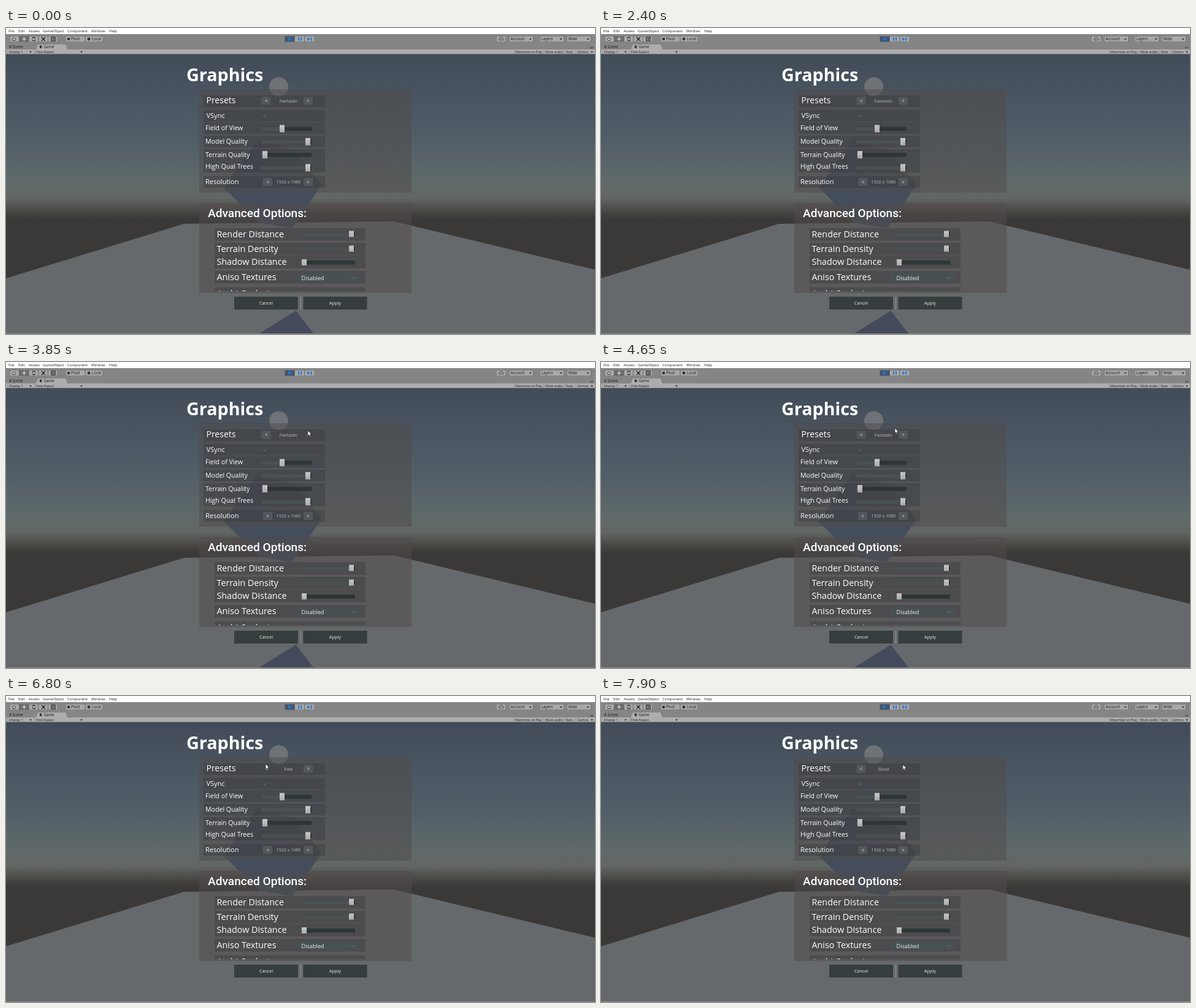
Animation of 960 by 500 pixels, one loop 8000 ms. Source, as an HTML page with a canvas:

```html
<!DOCTYPE html>
<html lang="en">
<head>
<meta charset="utf-8">
<title>Graphics settings</title>
<style>
html, body { margin: 0; width: 960px; height: 500px; overflow: hidden; background: #444; }
canvas { display: block; }
</style>
</head>
<body>
<canvas id="stage" width="960" height="500"></canvas>
<script>
const c = document.getElementById('stage').getContext('2d');
const LOOP = 8000, STEP = 50;
const INK = '#1a1a1a', BAR = '#adadad';

const levels = ['Fast', 'Simple', 'Good', 'Beautiful', 'Fantastic'];
const prevClicks = [1150, 3100, 5600, 6300, 6550, 6800];
const nextClicks = [1550, 3850, 7600, 7900];

const outside = [470, 0], prev = [423, 111], next = [492, 112];
// pointer moves: start, end, where it comes to rest
const moves = [
  [750, 1050, prev], [1250, 1550, next], [1600, 1950, [480, 136]], [1950, 2400, outside],
  [2500, 2750, next], [2750, 3050, prev], [3200, 3300, [425, 107]],
  [3400, 3800, next], [3950, 4150, [488, 111]], [4600, 4650, [479, 108]],
  [4650, 5000, [416, 111]], [5500, 5900, prev], [6800, 7450, next]
];

function box(x, y, w, h, fill) {
  c.fillStyle = fill;
  c.fillRect(x, y, w, h);
}
function text(s, x, y, size, { fill = '#fff', weight = 400, align = 'left', font = 'Open Sans' } = {}) {
  c.font = `${weight} ${size}px "${font}", sans-serif`;
  c.textAlign = align;
  c.fillStyle = fill;
  c.fillText(s, x, y);
}
function poly(points, fill, stroke, width = 1) {
  c.beginPath();
  points.forEach(([x, y]) => c.lineTo(x, y));
  if (fill) { c.closePath(); c.fillStyle = fill; c.fill(); }
  if (stroke) { c.strokeStyle = stroke; c.lineWidth = width; c.stroke(); }
}
function disc(x, y, r, fill) {
  c.beginPath();
  c.arc(x, y, r, 0, Math.PI * 2);
  c.fillStyle = fill;
  c.fill();
}
function shade(y, h, stops) {
  const g = c.createLinearGradient(0, y, 0, y + h);
  stops.forEach(([at, color]) => g.addColorStop(at, color));
  return g;
}

const drop = (x, y) => poly([[x - 2, y - 1], [x + 2, y - 1], [x, y + 1.2]], INK);
function button(x, w, label = '', inset = 2.5) {
  box(x, 13, w, 10, '#606060');
  box(x + .5, 13.5, w - 1, 9, '#a8a8a8');
  text(label, x + inset, 20.2, 6.2, { fill: INK });
}

function toolIcons() {
  for (let i = 0; i < 5; i++) button(6 + i * 15.6, 15.6);
  box(22, 13.5, 15, 9, '#6a6a6a');
  disc(13, 18.5, 2.6, '#333');
  disc(13, 18.5, 1.8, '#ccc');
  box(26, 17.5, 7, 1, '#eee');
  box(29, 14.5, 1, 7, '#eee');
  c.strokeStyle = INK;
  c.lineWidth = 1.2;
  for (const turn of [.4, 3.5]) {
    c.beginPath();
    c.arc(45.5, 18, 2.7, turn, turn + 2.3);
    c.stroke();
  }
  poly([[58, 15], [64, 21]], null, INK, 1.2);
  poly([[64, 15], [58, 21]], null, INK, 1.2);
  c.strokeRect(74, 15, 6, 6);
  box(76, 17, 2, 2, INK);
}

function playControls() {
  const blue = '#2878d8';
  for (let i = 0; i < 3; i++) button(454 + i * 16.4, 16.4);
  box(454.5, 13.5, 15.5, 9, '#42566f');
  poly([[460, 15], [466, 18], [460, 21]], blue);
  poly([[491, 15], [496, 18], [491, 21]], blue);
  [476, 480, 496.5].forEach(x => box(x, 15, 2, 6, blue));
}

function cloud() {
  button(799, 16);
  for (const [grow, fill] of [[0, '#333'], [-.7, '#a8a8a8']]) {
    disc(804.8, 18.7, 1.9 + grow, fill);
    disc(807.2, 17.3, 2.5 + grow, fill);
    disc(809.6, 18.6, 2 + grow, fill);
  }
}

function editor() {
  box(0, 0, 960, 10, '#fff');
  box(0, 10, 960, 25, '#858585');
  box(0, 35, 960, 8, BAR);
  box(0, 42.3, 960, .7, '#666');
  const menus = { File: 4, Edit: 20, Assets: 37, GameObject: 60, Component: 100, Window: 139, Help: 168 };
  for (const s in menus) text(s, menus[s], 7, 6, { fill: INK });

  toolIcons();
  button(97, 32, 'Pivot', 9);
  button(129, 29, 'Local', 11);
  box(100, 16, 4, 4, '#333');
  disc(135, 18, 2.4, '#333');
  playControls();
  cloud();
  const lists = { Account: 820, Layers: 870, Wide: 914 };
  for (const s in lists) {
    button(lists[s], 39.5, s);
    drop(lists[s] + 34.5, 18.2);
  }

  poly([[49, 35], [52, 27], [97, 27], [100, 35]], BAR);
  text('# Scene', 5, 33, 6.2, { fill: INK });
  disc(57, 30.8, 2.3, INK);
  box(57, 30, 3, 1.5, BAR);
  text('Game', 61.5, 33, 6.2, { fill: INK });
  [31, 32.7].forEach(y => box(952, y, 5, .6, '#333'));

  const options = { 'Display 1': 5, 'Free Aspect': 49, 'Maximize on Play': 830, 'Mute audio': 879, Stats: 912, Gizmos: 931 };
  for (const s in options) {
    text(s, options[s], 40.7, 5.4, { fill: INK, weight: 500 });
    box(options[s] - 2.5, 36, .5, 6, '#777');
  }
  [40, 123, 955].forEach(x => drop(x, 39.2));
}

function world(shadow) {
  box(0, 43, 960, 457, shade(43, 270, [
    [0, '#424c59'], [.5, '#505d67'], [.78, '#606a69'], [.87, '#626663'], [.96, '#454340'], [1, '#3b3937']]));
  poly([[0, 409], [290, 320], [632, 316], [960, 395], [960, 500], [0, 500]], '#66696b');
  disc(444.5, 96, 15.5, '#6f7377');
  poly([[410, 183], [470, 200], [514, 257], [466, 327], [413, 318], [355, 261]], '#434d5c');
  poly([[410, 183], [470, 200], [514, 257], [430, 240]], '#4b5159');
  if (shadow) poly([[472.5, 462], [501, 499], [413, 499]], '#434a5b');
  box(0, 499, 960, 1, '#858886');
}

const ROW = 'rgba(52,55,60,.36)';

function slider(x, w, y, value, height = 12) {
  const knob = x + 6 + value * (w - 12);
  box(x, y - 3, w, 6.5, '#2c3636');
  box(x, y - 3, knob - x, 6.5, '#495153');
  box(knob - 4, y - height / 2, 8, height, shade(y - 6, 12, [[0, '#c9c9c9'], [1, '#a9a9a9']]));
}
function stepper(y, label, x, x2, tip) {
  for (const [s, at] of [['<', x], ['>', x2]]) {
    const hover = tip && Math.hypot(tip[0] - at, tip[1] - y) < 10;
    if (!hover) box(at - 7.5, y - 6.5, 15, 13, '#52575b');
    text(s, at, y + 3, 8.2, { fill: '#e4e4e4', align: 'center' });
  }
  text(label, 460.5, y + 2.6, 7.1, { fill: '#b9babb', align: 'center' });
}
function action(label, x) {
  box(x, 439, 104, 21, '#363d3e');
  text(label, x + 52, 452, 7.2, { fill: '#eee', align: 'center' });
}

function basicOptions(preset, tip) {
  const rows = [['Presets', 123, 14], ['VSync', 147, 11], ['Field of View', 167, 10.5],
    ['Model Quality', 189, 10.6], ['Terrain Quality', 211, 10.6], ['High Qual Trees', 230, 10.6], ['Resolution', 255, 11]];
  rows.forEach(([s, y, size], i) => {
    box(322, y - 13, 198, 19, ROW);
    text(s, i < 2 ? 326.5 : 325, y + .3, size);
  });
  stepper(119, preset, 424, 492.5, tip);
  stepper(251.5, '1920 x 1080', 426.5, 492.5);
  box(417, 138, 10, 10, '#42474a');
  poly([[419, 143], [421.3, 145.5], [425.3, 140.5]], null, '#62686a', 1.2);
  [.4, 1, 0, 1].forEach((v, i) => slider(416, 82, 164.5 + i * 21.3, v));
}

function advancedOptions() {
  c.save();
  c.beginPath();
  c.rect(315, 286, 346, 144);
  c.clip();
  const rows = { 'Render Distance': 342, 'Terrain Density': 366, 'Shadow Distance': 387, 'Aniso Textures': 412, 'Ambi Occlusion': 438.5 };
  for (const s in rows) {
    box(340, rows[s] - 15, 246, 20.5, ROW);
    text(s, 343.5, rows[s] + .3, 14.3);
  }
  c.restore();
  slider(480, 89, 336.5, 1, 10);
  slider(480, 89, 360.5, 1, 10);
  slider(480, 89, 383, 0, 10);
  box(474, 401, 102, 14, '#475153');
  text('Disabled', 481.5, 411.7, 9.1, { fill: '#eee' });
  poly([[563.5, 407], [567, 410], [570.5, 407]], null, '#6b7273');
}

function menu(preset, tip) {
  const panel = 'rgba(82,76,76,.52)';
  box(315, 100, 346, 169, panel);
  box(315, 286, 346, 147, panel);
  text('Graphics', 294, 87, 28.7, { weight: 700 });
  text('Advanced Options:', 329, 308.8, 19.1, { weight: 500, font: 'Roboto' });
  basicOptions(preset, tip);
  advancedOptions();
  action('Cancel', 372);
  action('Apply', 484.5);
  box(479.8, 439, 1, 21, '#929596');
}

function pointerAt(t) {
  if (t < 750 || (t >= 2400 && t < 2500)) return null;
  let at = outside;
  for (const [from, to, spot] of moves) {
    const p = Math.min(1, Math.max(0, (t - from) / (to - from)));
    const ease = p * p * (3 - 2 * p);
    at = at.map((v, i) => v + (spot[i] - v) * ease);
  }
  return at;
}
function pointer([x, y]) {
  poly([[0, 0], [0, 8.3], [1.9, 6.6], [3.2, 9.4], [4.6, 8.8], [3.4, 6], [5.9, 5.9], [0, 0]]
    .map(([dx, dy]) => [x + dx, y + dy]), '#fff', '#111', .6);
}

function draw(now) {
  const t = Math.floor(now % LOOP / STEP) * STEP;
  const count = clicks => clicks.filter(at => at <= t).length;
  const preset = levels[4 - count(prevClicks) + count(nextClicks)];
  const tip = pointerAt(t);
  world(t < 6300);
  menu(preset, tip);
  editor();
  if (tip) pointer(tip);
}

const start = performance.now();
function tick() {
  draw(performance.now() - start);
  requestAnimationFrame(tick);
}
tick();
</script>
</body>
</html>
```
